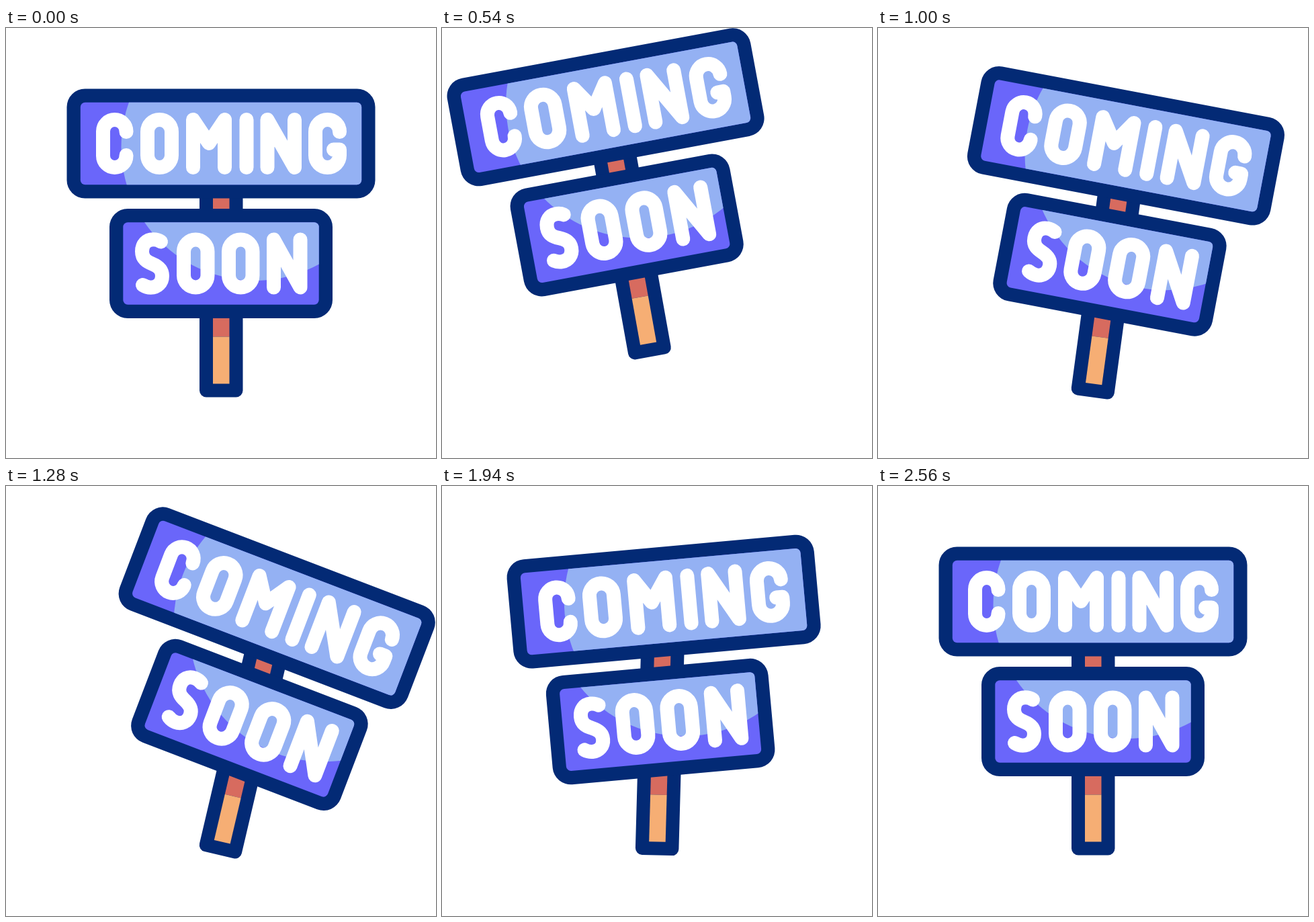
An HTML page with a canvas for the animation above (3.2 s loop, 640 px wide and 640 px high).

```html
<!DOCTYPE html>
<html lang="en">
<head>
<meta charset="utf-8">
<title>Coming soon</title>
<style>
  html, body { margin: 0; width: 100%; height: 100%; overflow: hidden; background: #fff; }
  canvas { display: block; width: 100vw; height: 100vh; }
</style>
</head>
<body>
<canvas id="stage" width="640" height="640" aria-label="Coming soon sign"></canvas>
<script>
const ctx = document.getElementById('stage').getContext('2d');
const LOOP = 3200, STEP = 20;
const NAVY = '#032a75', PURPLE = '#6a66fa', SKY = '#94b1f3', RED = '#d76b5f', ORANGE = '#f6ae74';
const PIVOT = { x: 320, y: 536 };

// Keys: [time, value, optional bias that delays the ease into this key]
const swing = [[0, 0], [540, -10.2, 1.2], [1230, 14], [1680, -8.9], [2150, 9.2], [2560, 0]];
const wobble = [[0, 0], [320, -0.65], [760, 0], [1330, 7.9], [1830, -8.8], [2290, 5.5], [2560, 0]];
const hop = [[0, 0], [545, 1, 1.3], [940, 0]];

function valueAt(keys, t) {
  for (let i = 1; i < keys.length; i++) {
    const [t0, v0] = keys[i - 1], [t1, v1, bias = 1] = keys[i];
    if (t < t1) {
      const u = ((t - t0) / (t1 - t0)) ** bias;
      return v0 + (v1 - v0) * u * u * (3 - 2 * u);
    }
  }
  return keys[keys.length - 1][1];
}

// Letter strokes, all 71 units tall on their centre lines
const ring = (x, y, w) => {
  const r = w / 2;
  return `M${x} ${y + r}a${r} ${r} 0 0 1 ${w} 0v${71 - w}a${r} ${r} 0 0 1 ${-w} 0z`;
};
const hook = (x, y, w, tail) => {
  const r = w / 2;
  return `M${x + w} ${y + 18}v${r - 18}a${r} ${r} 0 0 0 ${-w} 0v${71 - w}a${r} ${r} 0 0 0 ${w} 0${tail}`;
};
const letterN = (x, y, w) => `M${x} ${y + 71}v-71l${w} 71v-71`;

const coming = new Path2D(
  hook(144.5, 136.5, 34.5, 'V189.5') +
  ring(210.5, 136.5, 36) +
  'M278.5 207.5v-71L302 171.5L325.5 136.5v71' +
  'M358 136.5v71' +
  letterN(389, 136.5, 40.5) +
  hook(460.5, 136.5, 36, 'V181H487.5'));

const soon = new Path2D(
  'M230.5 318C226 315 222 314.8 219 314.8C209 314.8 202.5 322 202.5 332.5' +
  'C202.5 344 210 348 217.5 351C226 354.5 232.5 359 232.5 369' +
  'C232.5 379.5 225 386.2 215.5 386.2C211 386.2 207.5 385 203.5 382.5' +
  ring(264.5, 315, 35.5) +
  ring(331.5, 315, 35.5) +
  letterN(398.5, 315, 39.5));

const boards = [
  { x: 90.5, y: 90.5, w: 459, h: 163, word: coming },
  { x: 154, y: 269, w: 332, h: 163, word: soon }
];

function rounded(x, y, w, h, r) {
  ctx.beginPath();
  ctx.roundRect(x, y, w, h, r);
}

function box(x, y, w, h, color, r = 0) {
  rounded(x, y, w, h, r);
  ctx.fillStyle = color;
  ctx.fill();
}

function rotateAbout(x, y, degrees) {
  ctx.translate(x, y);
  ctx.rotate(degrees * Math.PI / 180);
  ctx.translate(-x, -y);
}

function drawPost() {
  box(288, 172, 64.5, 377.5, NAVY, 10);
  box(308, 172, 24.5, 287.5, RED);
  box(308, 459.5, 24.5, 70, ORANGE);
}

function drawBoard({ x, y, w, h, word }, tilt) {
  ctx.save();
  rotateAbout(x + w / 2, y + h / 2, tilt);
  box(x, y, w, h, NAVY, 27);
  box(x + 20.3, y + 20.3, w - 40.6, h - 40.6, PURPLE, 7);
  ctx.save();
  rounded(x + 20.3, y + 20.3, w - 40.6, h - 40.6, 7);
  ctx.clip();
  ctx.beginPath();
  ctx.arc(370.5, 177, 199, 0, Math.PI * 2);
  ctx.fillStyle = SKY;
  ctx.fill();
  ctx.restore();
  ctx.strokeStyle = '#fff';
  ctx.lineWidth = 21;
  ctx.lineCap = ctx.lineJoin = 'round';
  ctx.stroke(word);
  ctx.restore();
}

function draw(t) {
  const lift = valueAt(hop, t), tilt = valueAt(wobble, t);
  ctx.fillStyle = '#fff';
  ctx.fillRect(0, 0, 640, 640);
  ctx.save();
  ctx.translate(-12 * lift, -60 * lift);
  rotateAbout(PIVOT.x, PIVOT.y, valueAt(swing, t));
  drawPost();
  boards.forEach(board => drawBoard(board, tilt));
  ctx.restore();
}

const start = performance.now();
function tick() {
  const t = (performance.now() - start) % LOOP;
  draw(Math.floor(t / STEP) * STEP);
  requestAnimationFrame(tick);
}
tick();
</script>
</body>
</html>
```
